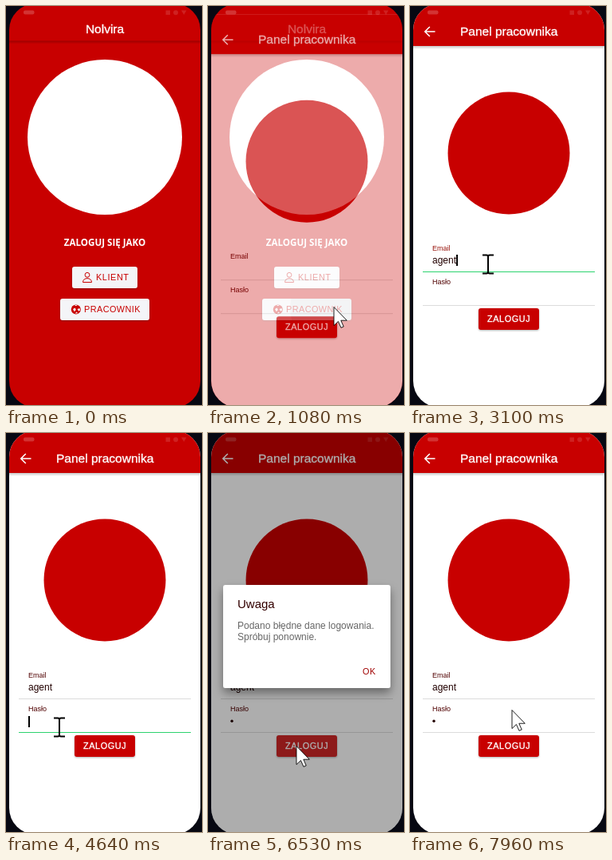
An HTML page for the animation above (8 s loop, 246 by 499 pixels).

```html
<!DOCTYPE html>
<html lang="pl">
<head>
<meta charset="utf-8">
<title>Panel pracownika</title>
<style>
  html, body { margin: 0; height: 100%; overflow: hidden; background: #070812; }
  svg { display: block; width: 100vw; height: 100vh; }
  text { font: 12px "Liberation Sans", Arial, sans-serif; white-space: pre; }
  .title { font-size: 15.5px; }
  .title, .light { fill: #fff; stroke: #fff; stroke-width: .35px; }
  .btn { font-size: 10.85px; letter-spacing: .6px; }
  .label { font-size: 9px; fill: #500000; }
  .body { fill: #666; }
  .red { fill: #c80000; }
  .line { fill: none; stroke: #c80000; }
</style>
</head>
<body>
<svg viewBox="0 0 246 499">
  <defs>
    <clipPath id="phone"><rect x="4" y="-3" width="240" height="505" rx="33"/></clipPath>
    <clipPath id="workerClip"><rect x="68" y="366" width="112" height="27" rx="3"/></clipPath>
    <clipPath id="loginClip"><rect x="86" y="378" width="76" height="27" rx="3"/></clipPath>
    <linearGradient id="fade" x2="0" y2="1">
      <stop stop-opacity=".22"/><stop offset="1" stop-opacity="0"/>
    </linearGradient>
    <filter id="soft" x="-20%" y="-20%" width="140%" height="150%">
      <feDropShadow dx="0" dy="1" stdDeviation="1" flood-opacity=".3"/>
    </filter>
    <filter id="deep" x="-20%" y="-20%" width="140%" height="150%">
      <feDropShadow dx="0" dy="6" stdDeviation="6" flood-opacity=".4"/>
    </filter>
  </defs>

  <g clip-path="url(#phone)">
    <g id="start">
      <rect width="246" height="499" class="red"/>
      <rect y="43.5" width="246" height="4" fill="url(#fade)"/>
      <text class="title" x="124" y="34" text-anchor="middle">Nolvira</text>
      <circle cx="124" cy="164" r="97" fill="#fff"/>
      <text x="124" y="300" text-anchor="middle" fill="#fff"
        style="font:700 11.6px 'Open Sans','Noto Sans',sans-serif">ZALOGUJ SIĘ JAKO</text>
      <g filter="url(#soft)" fill="#f4f5f8">
        <rect x="83" y="326" width="82" height="27" rx="3"/>
        <rect id="worker" x="68" y="366" width="112" height="27" rx="3"/>
      </g>
      <circle id="workerRipple" cx="158" cy="378" fill-opacity=".08" clip-path="url(#workerClip)"/>
      <circle class="line" cx="102" cy="336.3" r="2.9"/>
      <path class="line" d="M96.5 345.5c0-6.5 11-6.5 11 0z"/>
      <text class="btn red" x="113" y="343">KLIENT</text>
      <circle class="red" cx="87.8" cy="379.5" r="6"/>
      <path fill="#f4f5f8" d="M87.8 375.2l2-1.2h-4zM84 379l2.8-1.4 1 2.4-2 2.2zM89.5 379l3-1 .6 2.4-2 1.4zM86.6 384.6l2-2 1.6 1.6z"/>
      <text class="btn red" x="98" y="383" style="letter-spacing:.45px">PRACOWNIK</text>
    </g>

    <g id="panel">
      <rect width="246" height="540" fill="#fff"/>
      <rect width="246" height="50" class="red"/>
      <rect y="50" width="246" height="4" fill="url(#fade)"/>
      <path d="M31.5 32H19M24.8 26l-6 6 6 6" fill="none" stroke="#fff" stroke-width="1.6"/>
      <text class="title" x="63" y="37">Panel pracownika</text>
      <circle class="red" cx="124" cy="184" r="76.5"/>
      <text class="label" id="mailLabel" x="28" y="306">Email</text>
      <text id="mail" x="28" y="322" fill="#200"></text>
      <text class="label" x="28" y="348">Hasło</text>
      <circle id="dot" cx="30" cy="360.3" r="1.7" fill="#200"/>
      <rect id="mailLine" x="16" y="332" width="216" height="1"/>
      <rect id="passLine" x="16" y="374" width="216" height="1"/>
      <rect id="caret" width="2" height="14"/>
      <rect class="red" x="86" y="378" width="76" height="27" rx="3" filter="url(#soft)"/>
      <circle id="loginRipple" cx="111" cy="391" fill="#fff" fill-opacity=".15" clip-path="url(#loginClip)"/>
      <text class="btn light" x="97" y="395">ZALOGUJ</text>
    </g>

    <g fill="#fff" fill-opacity=".13">
      <rect x="22" y="5.5" width="13.5" height="5" rx="2" fill-opacity=".2"/>
      <rect x="200.5" y="5.5" width="5.5" height="5.5"/>
      <circle cx="213" cy="8.2" r="3"/>
      <path d="M220 5.5h6.5l-3.2 5.5z"/>
    </g>

    <rect id="shade" width="246" height="499"/>
    <g id="alert">
      <rect x="19" y="190" width="210" height="129" rx="3" fill="#fff" filter="url(#deep)"/>
      <text x="37" y="219" fill="#300" style="font-size:15px">Uwaga</text>
      <text class="body" x="37" y="245">Podano błędne dane logowania.</text>
      <text class="body" x="37" y="259">Spróbuj ponownie.</text>
      <text class="btn" x="194" y="302" fill="#a00000">OK</text>
    </g>
  </g>

  <g id="pointer">
    <path id="arrow" d="M0 0V17L4 13.2 6.6 19 9 18 6.5 12.3H12Z" transform="translate(0 .5) scale(1.36)"
      fill="#fff" stroke="#000" stroke-width=".65"/>
    <path id="beam" d="M-7-11.5h5q2 0 2 2 0-2 2-2h5M0-10v20M-7 11.5h5q2 0 2-2 0 2 2 2h5"
      fill="none" stroke="#000" stroke-width="2"/>
  </g>
</svg>

<script>
const LOOP = 8000, USER = 'agent';
const KEY_TIMES = [2430, 2640, 2770, 2900, 3100];
const BLINK = 530;
// pointer stops: time, x, y
const PATH = [
  [300, 238, 488], [690, 158, 376], [1290, 158, 376], [1620, 105, 327], [1760, 98, 323],
  [3630, 98, 323], [3630, 234, 356], [4090, 234, 356], [4640, 67, 368], [5830, 67, 368],
  [6250, 111, 391], [6670, 111, 391], [7200, 202, 298], [7620, 202, 298], [7960, 128, 346]
];

const ui = {};
document.querySelectorAll('[id]').forEach(e => ui[e.id] = e);
const set = (e, attrs) => { for (const k in attrs) e.setAttribute(k, attrs[k]); };
const show = (e, on) => e.style.display = on ? '' : 'none';
const part = (t, a, b) => Math.min(1, Math.max(0, (t - a) / (b - a)));
const ease = p => p * p * (3 - 2 * p);
const within = (v, a, b) => v >= a && v < b;

function pointerAt(t) {
  let i = 0;
  while (i < PATH.length - 2 && t >= PATH[i + 1][0]) i++;
  const [a, x, y] = PATH[i], [b, u, v] = PATH[i + 1], p = ease(part(t, a, b));
  return [x + (u - x) * p, y + (v - y) * p];
}

function drawPointer(t) {
  const [x, y] = pointerAt(t);
  const overInput = t > 1300 && !within(t, 6385, 7750) && within(x, 28, 232) &&
    (within(y, 311, 330) || within(y, 354, 373));
  show(ui.pointer, t >= 300);
  show(ui.arrow, !overInput);
  show(ui.beam, overInput);
  set(ui.pointer, { transform: `translate(${x} ${y})` });
}

function drawForm(t) {
  const onMail = within(t, 1620, 4500), onPass = within(t, 4500, 6300);
  const typed = KEY_TIMES.filter(k => t >= k).length;
  ui.mail.textContent = USER.slice(0, typed);
  set(ui.mailLine, { fill: onMail ? '#2dd36f' : '#dcdcdc' });
  set(ui.passLine, { fill: onPass ? '#2dd36f' : '#dcdcdc' });
  ui.mailLabel.style.fill = onMail ? '#961008' : '';
  show(ui.dot, t >= 5030);

  // blinking restarts at every key press
  const reset = Math.max(...[1630, ...KEY_TIMES, 4500, 5030].filter(k => t >= k), 0);
  const wait = reset === 5030 ? 600 : BLINK;
  show(ui.caret, (onMail || onPass) && Math.floor((t - reset) / wait) % 2 === 0);
  set(ui.caret, onMail
    ? { x: 28 + (typed ? ui.mail.getComputedTextLength() : 0), y: 311 }
    : { x: t < 5030 ? 28 : 31, y: 354 });
}

function draw(t) {
  const enter = 1 - (1 - part(t, 1010, 1290)) ** 3.8;
  show(ui.start, t < 1290);
  show(ui.panel, t >= 1010);
  set(ui.panel, { opacity: enter, transform: `translate(0 ${31 * (1 - enter)})` });

  set(ui.worker, { fill: t < 690 ? '#f4f5f8' : '#eeeff2' });
  set(ui.workerRipple, { r: 70 * part(t, 830, 1150) });
  set(ui.loginRipple, { r: 60 * part(t, 6390, 6530), opacity: 1 - part(t, 6700, 6900) });

  const open = ease(part(t, 6378, 6530)), leave = 1 - part(t, 7540, 7720);
  const scale = .9 + .1 * open;
  set(ui.shade, { opacity: .32 * open * leave });
  set(ui.alert, {
    opacity: open * leave,
    transform: `translate(124 254.5) scale(${scale}) translate(-124 -254.5)`
  });

  drawForm(t);
  drawPointer(t);
}

const begin = performance.now();
function tick() {
  draw((performance.now() - begin) % LOOP);
  requestAnimationFrame(tick);
}
tick();
</script>
</body>
</html>
```
